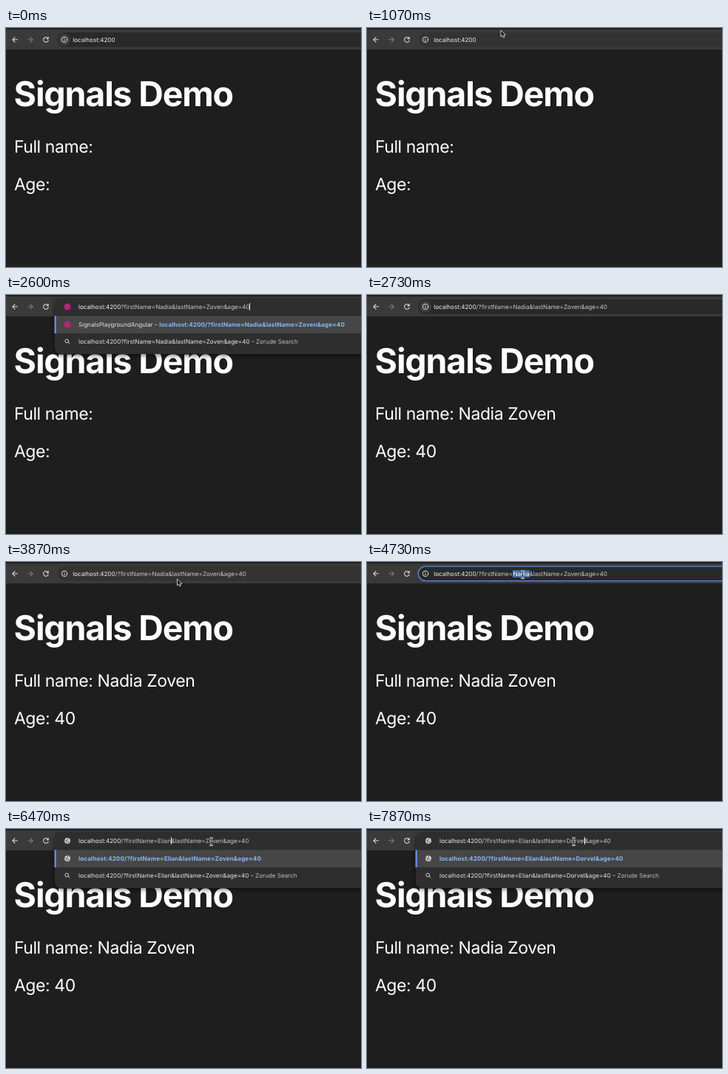
Animation of 480x324 px, one loop 8 s. Source, as an HTML page:

```html
<!DOCTYPE html>
<html lang="en">
<head>
<meta charset="utf-8">
<title>Signals Demo</title>
<style>
  html, body { margin: 0; width: 100%; height: 100%; overflow: hidden; background: #1e1e1e; }
  #stage {
    position: relative; width: 480px; height: 324px; overflow: hidden;
    background: #1e1e1e; color: #fff;
    font-family: Inter, "Open Sans", sans-serif; text-rendering: geometricPrecision;
  }
  svg { position: absolute; left: 0; top: 0; }

  /* Zero line height centres each line on its top value. */
  .line { position: absolute; margin: 0; line-height: 0; white-space: pre; }
  .page { left: 10.9px; font-size: 23px; letter-spacing: -.018em; }
  h1.page { left: 10.6px; top: 89.9px; font-size: 46.5px; font-weight: 700; letter-spacing: -.025em; }

  .small { left: 98px; font-size: 8.1px; color: #e3e3e3; }
  #url { top: 15.5px; color: #c7c7c7; }
  #url b { font-weight: 400; color: #f1f1f1; }
  #url mark { background: #4269a8; color: #fff; }
  #url mark b { color: #fff; }
  #url i { display: inline-block; position: relative; width: 0; height: 0; }
  #url i::after { content: ""; position: absolute; left: -.3px; bottom: -2.4px; width: .7px; height: 10px; background: #ddd; }
  #best { top: 40px; }
  #best b { color: #8ab4f8; font-weight: 700; letter-spacing: .012em; }
  #search { top: 63px; }
  .grey { color: #bdbdbd; }

  #pill { fill: #292929; }
  .hover #pill { fill: #333; }
  .hover #halo { display: none; }
  .focus #pill { stroke: #5f8ad6; stroke-width: 1.3; }
  .focus #halo { display: none; }
  .idle #url, .hover #url, .focus #url { left: 90.3px; }
  #popup, .row { display: none; }
  .open #popup, .open .row { display: block; }
  .open #info { display: none; }
  .globe, .fav { display: none; }
  [data-icon=globe] .globe, [data-icon=fav] .fav { display: block; }
  #stop, .loading #reload { display: none; }
  .loading #stop { display: block; }
</style>
</head>
<body>
<div id="stage">
  <h1 class="line page">Signals Demo</h1>
  <p class="line page" id="name" style="top:160.7px"></p>
  <p class="line page" id="age" style="top:211.5px"></p>

  <svg width="480" height="324" fill="none" stroke-linecap="round" stroke-linejoin="round">
    <defs>
      <filter id="soft" x="-10%" y="-20%" width="120%" height="150%"><feGaussianBlur stdDeviation="3"/></filter>
      <g id="world">
        <circle r="3.9" fill="#d5d5d5"/>
        <path d="M-3-1.2 -.8.8 -.8 2.8M.6-3 .2-1.2 -1-.7M1.2.6 1.8 2.2" stroke="#383838" stroke-width=".9"/>
      </g>
    </defs>
    <rect width="480" height="29" fill="#3a3a3a"/>
    <rect width="480" height="2" fill="#202020"/>
    <g stroke="#d5d5d5" stroke-width="1.1">
      <path d="M15.5 15.8H9M12 12.6 8.8 15.8 12 19"/>
      <path d="M29.5 15.8H36M33 12.6 36.2 15.8 33 19" stroke="#7c7c7c"/>
      <path id="reload" d="M56.6 13.7A3.4 3.4 0 1 0 57.2 17M57.2 12.4V14.6H55"/>
      <path id="stop" d="M51.2 13 56.8 18.6M56.8 13 51.2 18.6"/>
    </g>
    <rect id="pill" x="69.2" y="5.9" width="440" height="19.8" rx="9.9"/>
    <g id="info">
      <circle id="halo" cx="79" cy="15.8" r="8" fill="#3d3d3d"/>
      <circle cx="79" cy="15.8" r="3.7" stroke="#dcdcdc"/>
      <path d="M79 15.6V17.6M79 13.9V14" stroke="#dcdcdc"/>
    </g>
    <g id="popup">
      <rect x="66" y="8" width="440" height="74" rx="8" fill="#000" opacity=".55" filter="url(#soft)"/>
      <rect x="66" y="4" width="440" height="76" rx="8" fill="#2e2e2e"/>
      <rect x="66" y="28.5" width="420" height="23.5" fill="#464646"/>
      <rect x="65.5" y="28.5" width="2.2" height="23.5" fill="#6696f2"/>
      <g class="globe"><use href="#world" x="83" y="16"/><use href="#world" x="83" y="40"/></g>
      <g class="fav" fill="#b3247a"><circle cx="83" cy="16" r="4.6"/><circle cx="83" cy="40" r="4.6"/></g>
      <path d="M84 64 86.2 66.2M84.6 62.4A2.4 2.4 0 1 1 79.8 62.4 2.4 2.4 0 0 1 84.6 62.4" stroke="#cfcfcf"/>
    </g>
  </svg>

  <div class="line small" id="url"></div>
  <div class="line small row" id="best"></div>
  <div class="line small row" id="search"></div>

  <svg width="480" height="324" fill="none">
    <g id="mouse">
      <path id="arrow" d="M0 0V8.8L2 7 3.4 10 5 9.3 3.7 6.3H6.4Z" fill="#111" stroke="#eee" stroke-width=".8"/>
      <g id="beam">
        <path d="M-2.3-5Q0-5 0-3.4V3.4Q0 5-2.3 5M2.3-5Q0-5 0-3.4V3.4Q0 5 2.3 5M-1.2 1.6H1.2" stroke="#eee" stroke-width="1.9"/>
        <path d="M-2.3-5Q0-5 0-3.4V3.4Q0 5-2.3 5M2.3-5Q0-5 0-3.4V3.4Q0 5 2.3 5M-1.2 1.6H1.2" stroke="#222" stroke-width=".8"/>
      </g>
    </g>
  </svg>
</div>

<script>
const LOOP = 8000;
const HOST = 'localhost:4200';
const $ = id => document.getElementById(id);

// Brackets mark the selection, a bar marks the caret.
const query = (first, last) => `?firstName=${first}&lastName=${last}&age=40`;
const edit = (first, last) => ({ url: `${HOST}/${query(first, last)}` });

const steps = [
  [0, { mode: 'idle', icon: 'globe', url: HOST, full: '', age: '', title: '', loading: false }],
  [1800, { mode: 'focus', url: `[${HOST}]` }],
  [1870, { url: HOST + '|' }],
  [2130, { mode: 'open', url: HOST + query('Nadia', 'Zoven') + '|' }],
  [2200, { icon: 'fav', title: 'SignalsPlaygroundAngular' }],
  [2670, { mode: 'idle', icon: 'globe', title: '', loading: true, ...edit('Nadia', 'Zoven') }],
  [2730, { loading: false, full: ' Nadia Zoven', age: ' 40' }],
  [4130, { mode: 'focus', url: `[${HOST}/${query('Nadia', 'Zoven')}]` }],
  [4330, edit('Nad|ia', 'Zoven')],
  [4470, edit('[Nadia]', 'Zoven')],
  [5000, { mode: 'open', ...edit('E|', 'Zoven') }],
  [5130, edit('El|', 'Zoven')],
  [5200, edit('Eli|', 'Zoven')],
  [5330, edit('Elia|', 'Zoven')],
  [5470, edit('Elian|', 'Zoven')],
  [5970, edit('Elian', 'Zoven')],
  [6470, edit('Elian|', 'Zoven')],
  [6730, edit('Elian', 'Z|oven')],
  [6930, edit('Elian', '[Zoven]')],
  [7330, edit('Elian', 'D|')],
  [7470, edit('Elian', 'Do|')],
  [7530, edit('Elian', 'Dor|')],
  [7670, edit('Elian', 'Dorv|')],
  [7730, edit('Elian', 'Dorve|')],
  [7870, edit('Elian', 'Dorvel|')],
];

// Pointer strokes: time, x, y
const strokes = [
  [[1000, 184, -3], [1070, 181, 3], [1400, 158, 15], [1750, 142, 18], [1930, 142, 18]],
  [[3270, 318, 119], [3600, 262, 55], [3870, 231.5, 23], [4070, 212, 17], [4470, 210.5, 17],
   [5670, 210.5, 17], [6000, 317, 33], [6130, 317, 33], [6400, 277.5, 17],
   [6530, 277.5, 17], [6730, 279.5, 17], [LOOP, 279.5, 17]],
];

const escape = s => s.replace(/&/g, '&amp;');
const smooth = p => p * p * (3 - 2 * p);

function pointer(t) {
  const path = strokes.find(s => t >= s[0][0] && t < s[s.length - 1][0]);
  if (!path) return null;
  const i = path.findIndex(p => p[0] > t);
  const [t0, x0, y0] = path[i - 1], [t1, x1, y1] = path[i];
  const k = smooth((t - t0) / (t1 - t0));
  return { x: x0 + (x1 - x0) * k, y: y0 + (y1 - y0) * k };
}

function show(s) {
  const plain = escape(s.url.replace(/[[\]|]/g, ''));
  $('url').innerHTML = escape(s.url)
    .replace(HOST, `<b>${HOST}</b>`)
    .replace('[', '<mark>').replace(']', '</mark>')
    .replace('|', '<i></i>');
  const lead = s.title && `${s.title} <span class="grey">–</span> `;
  $('best').innerHTML = `${lead}<b>${plain.replace('0?', '0/?')}</b>`;
  $('search').innerHTML = `${plain} <span class="grey">– Zorude Search</span>`;
  $('name').textContent = 'Full name:' + s.full;
  $('age').textContent = 'Age:' + s.age;
  $('stage').dataset.icon = s.icon;
}

let current = -1, state;

function draw(t) {
  const count = steps.filter(s => s[0] <= t).length;
  if (count !== current) {
    current = count;
    state = Object.assign({}, ...steps.slice(0, count).map(s => s[1]));
    show(state);
  }
  const m = pointer(t);
  const mode = state.mode === 'idle' && m && m.y < 27 ? 'hover' : state.mode;
  $('stage').className = mode + (state.loading ? ' loading' : '');

  $('mouse').style.display = m ? '' : 'none';
  if (m) {
    const text = m.y > 9 && m.y < 21;
    $('mouse').setAttribute('transform', `translate(${m.x} ${m.y})`);
    $('beam').style.display = text ? '' : 'none';
    $('arrow').style.display = text ? 'none' : '';
  }
}

const start = performance.now();
function tick() {
  draw((performance.now() - start) % LOOP);
  requestAnimationFrame(tick);
}
tick();
</script>
</body>
</html>
```
